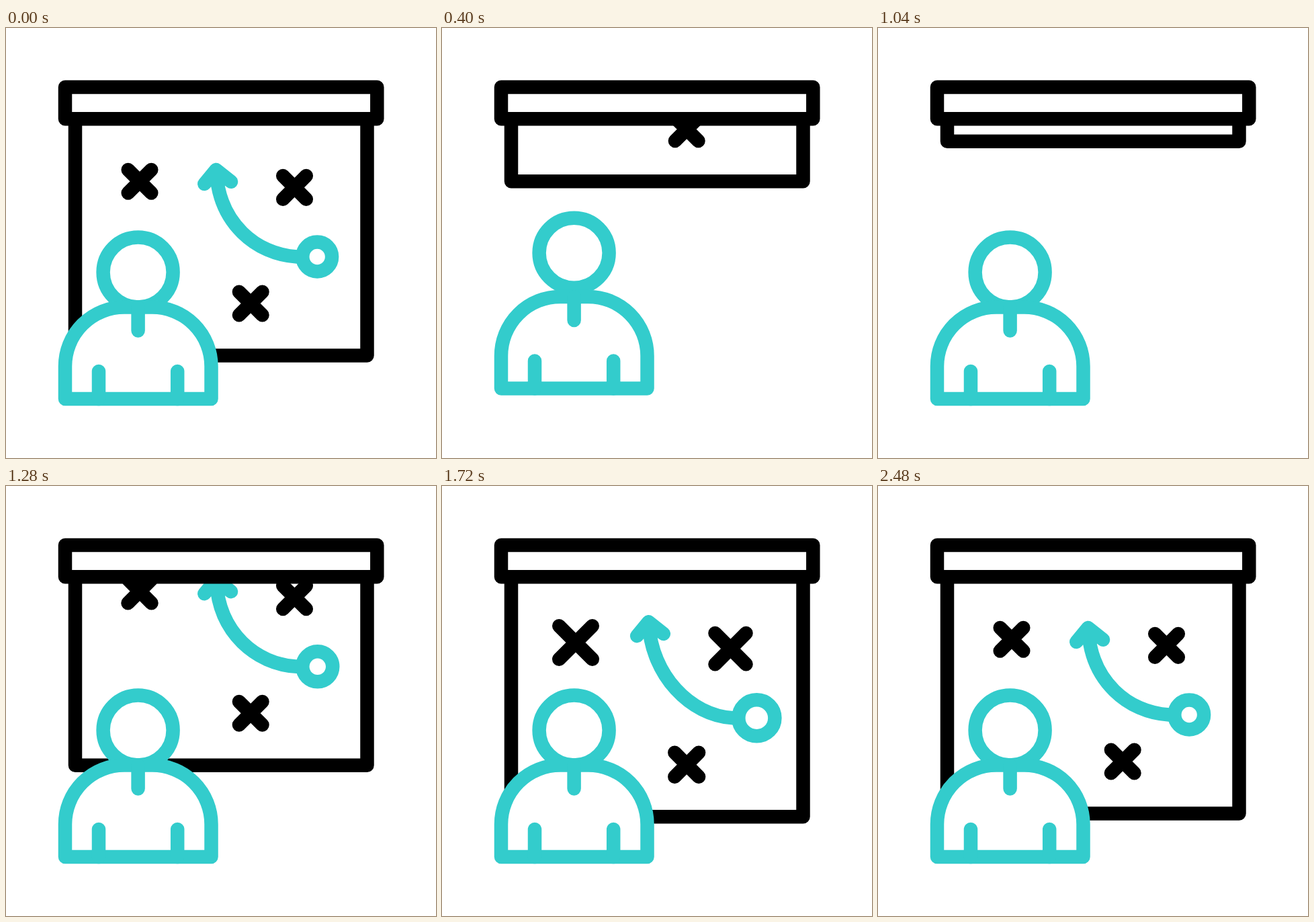
Recreate the animation shown at these times as an HTML page. Size 640 px wide and 640 px high, loop 2.6 s.

```html
<!DOCTYPE html>
<html lang="en">
<head>
<meta charset="utf-8">
<title>Coach and tactics board</title>
<style>
  html, body { margin: 0; width: 100%; height: 100%; overflow: hidden; background: #fff; }
  svg { display: block; width: 100vw; height: 100vh; }
  .ink, .teal { fill: none; stroke: #000; stroke-width: 20.5; stroke-linecap: round; stroke-linejoin: round; }
  .teal { stroke: #3cc; }
  .solid { fill: #fff; }
</style>
</head>
<body>
<svg viewBox="0 0 640 640">
  <clipPath id="below"><rect y="136" width="640" height="504"/></clipPath>
  <g clip-path="url(#below)">
    <g id="board">
      <path class="ink" d="M103 -320V487.5H537.5V-320"/>
      <path class="ink" id="x1"/>
      <path class="ink" id="x2"/>
      <path class="ink" id="x3"/>
      <path class="teal" id="arrow"/>
      <circle class="teal" id="ring" cy="340.5"/>
    </g>
  </g>
  <rect class="ink solid" x="88" y="88" width="464.3" height="47.3"/>
  <circle class="teal solid" id="head" cx="196.6" cy="363.6" r="52"/>
  <g id="body">
    <path class="teal solid" d="M88 552V503.5A88 88 0 0 1 176 415.5H217.5A88 88 0 0 1 305.5 503.5V552Z"/>
    <path class="teal" d="M196.6 415.5V450.5M138 511V552M255.2 511V552"/>
  </g>
</svg>
<script>
  const LOOP = 2600, STEP = 40;
  const el = id => document.getElementById(id);
  const set = (id, name, value) => el(id).setAttribute(name, value);
  const shiftY = (id, y) => set(id, "transform", `translate(0 ${y.toFixed(2)})`);

  // Eased 0 to 1 between two times
  const ease = (t, from, to) => {
    const u = Math.min(1, Math.max(0, (t - from) / (to - from)));
    return u * u * (3 - 2 * u);
  };
  // Rise to 1 at the peak, then back to 0
  const pulse = (t, from, peak, to) => ease(t, from, peak) - ease(t, peak, to);

  const cross = (id, x, y, h) =>
    set(id, "d", `M${x - h} ${y - h}L${x + h} ${y + h}M${x + h} ${y - h}L${x - h} ${y + h}`);

  function draw(t) {
    shiftY("board", -400 * ease(t, 64, 624) + 409.5 * ease(t, 880, 1440) - 9.5 * ease(t, 1440, 2000));
    shiftY("body", -22 * pulse(t, 40, 600, 1040));
    shiftY("head", -48.5 * pulse(t, 90, 640, 1040));

    [[199, 228.3, 1240], [429.5, 237.4, 1450], [364.2, 410, 1650]].forEach(([x, y, start], i) =>
      cross("x" + (i + 1), x, y, 17.3 + 8 * pulse(t, start, start + 415, start + 830)));

    const grow = 6 * pulse(t, 1200, 1620, 2040);
    set("ring", "r", 21.9 + grow);
    set("ring", "cx", 463.2 + grow);

    // The arrow's tip stretches away from its fixed end at the ring
    const up = 17 * pulse(t, 1300, 1890, 2480), left = up * 0.38;
    const p = (x, y) => `${x - left} ${y - up}`;
    set("arrow", "d",
      `M433 340.5C${372 - left / 2} 337 ${p(317, 290)} ${p(313, 214)}` +
      `M${p(295.3, 232)}L${p(312.6, 211)}L${p(335, 228.8)}`);
  }

  const begin = performance.now();
  function tick() {
    const t = (performance.now() - begin) % LOOP;
    draw(Math.floor(t / STEP) * STEP);
    requestAnimationFrame(tick);
  }
  draw(0);
  requestAnimationFrame(tick);
</script>
</body>
</html>
```
